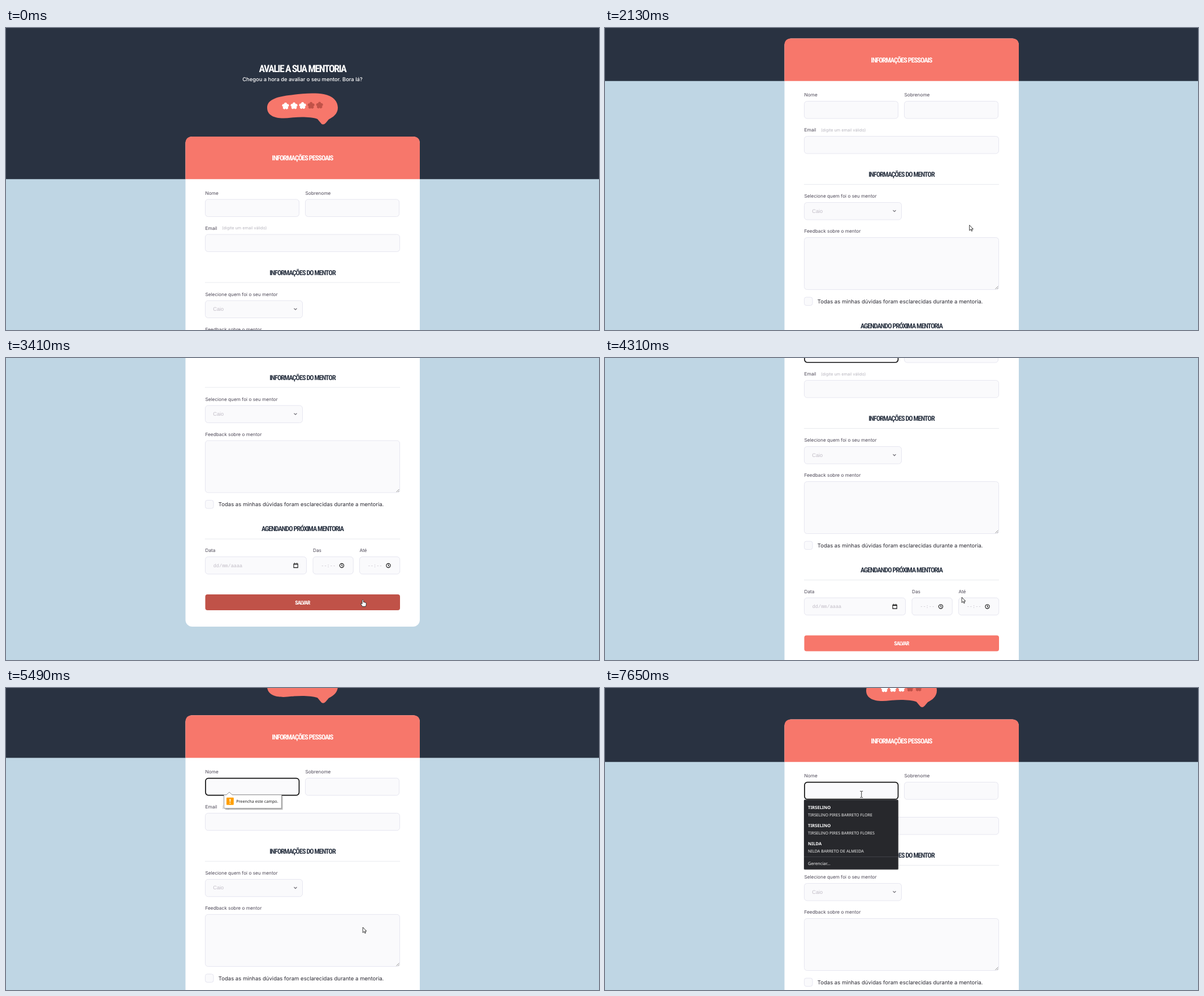
An HTML page for the animation above (8 s loop, 1049 by 534 pixels).

```html
<!DOCTYPE html>
<html lang="pt-BR">
<head>
<meta charset="utf-8">
<title>Avalie a sua mentoria</title>
<style>
  html, body { margin: 0; height: 100%; overflow: hidden; background: #bfd6e4; }
  svg { display: block; width: 100vw; height: 100vh; }
  text { font-family: Inter, sans-serif; text-rendering: geometricPrecision; }
  .head { font-family: "Roboto Condensed", Roboto, sans-serif; font-weight: 700;
          font-stretch: condensed; letter-spacing: -.08em; text-anchor: middle; }
  .h1 { font-size: 17.8px; fill: #fff; }
  .h2 { font-size: 12.2px; fill: #293241; }
  .light { fill: #fff; }
  .save { font-size: 9.7px; fill: #fff; }
  .sub { font-size: 9.35px; font-weight: 500; fill: #fff; text-anchor: middle; }
  .label { font-size: 8.25px; fill: #4e4958; }
  .hint { font-size: 7.25px; fill: #b7b5be; }
  .check { font-size: 9.55px; fill: #2b2a33; }
  .option { font: 9.2px "Liberation Sans", sans-serif; fill: #c1bcc6; }
  .mono { font: 8.6px "Liberation Mono", monospace; fill: #c1bcc6; }
  .tip { font: 7.2px "Noto Sans", sans-serif; fill: #222; }
  .bold { font: 600 7.6px "Noto Sans", sans-serif; fill: #fff; }
  .small { font: 7.2px "Noto Sans", sans-serif; fill: #f2f2f2; }
  .more { font: 7.6px "Noto Sans", sans-serif; fill: #f2f2f2; }
  .field { fill: #fafafc; stroke: #e6e6f0; }
  .rule { stroke: #e8eaee; }
  .icon { fill: none; stroke: #111; stroke-width: 1.1; }
</style>
</head>
<body>
<svg viewBox="0 0 1049 534" preserveAspectRatio="none">
  <defs>
    <g id="flower"></g>
    <g id="clock" class="icon"><circle r="3.6"/><path d="M0-2.3V.2L1.6 1"/></g>
  </defs>
  <g id="page"></g>
  <g id="menu"></g>
  <g id="cursor" stroke="#222" stroke-width=".9" stroke-linejoin="round" fill="#fff">
    <path id="arrow" d="M0 0V9.6L2.3 7.5 3.8 10.8 5.2 10.1 3.8 7H6.6Z"/>
    <path id="hand" d="M-1.2 1Q0-1 1.1 1V4.2Q2.1 3.5 2.9 4.6 3.9 4 4.6 5.1 6 4.8 6 6.2V8.6Q5.8 10.2 4.8 12H-.8Q-1.6 9.8-3.6 7.6-3.8 6-2.3 6.4L-1.2 7.3Z"/>
    <path id="beam" fill="none" d="M-2.5-5.5H-.6L0-5 .6-5.5H2.5M0-5V5M-2.5 5.5H-.6L0 5 .6 5.5H2.5"/>
  </g>
</svg>
<script>
const LOOP = 8000;
const $ = id => document.getElementById(id);
const text = (cls, x, y, s) => `<text class="${cls}" x="${x}" y="${y}">${s}</text>`;
const head = (cls, y, s) => text('head ' + cls, 524.5, y, s);
const rule = y => `<path class="rule" d="M352 ${y}H697"/>`;
const box = (x, y, w, h = 30.5, r = 5) =>
  `<rect class="field" x="${x}" y="${y}" width="${w}" height="${h}" rx="${r}"/>`;
// A label with its input box below
const field = (label, x, y, w, h) => text('label', x, y - 8.4, label) + box(x, y, w, h);
const use = (id, x, y, fill = '') => `<use href="#${id}" x="${x}" y="${y}" fill="${fill}"/>`;
const five = fn => [0, 1, 2, 3, 4].map(fn).join('');

$('flower').innerHTML = '<circle r="3.6"/>' + five(i =>
  `<circle cy="-3.7" r="2.5" transform="rotate(${i * 72})"/>`);

$('page').innerHTML = `
  <path fill="#293241" d="M0 0H1049V267.2H0Z"/>
  ${head('h1', 77.8, 'AVALIE A SUA MENTORIA')}
  ${text('sub', 524.5, 93.8, 'Chegou a hora de avaliar o seu mentor. Bora lá?')}
  <path fill="#f7776b" d="M462 141C462 127 478 122 500 119 520 116 545 114 562 117
    579 120 587 130 587 141 587 152 578 158 571 161.5L565.5 168Q560 173.5 556 167L551 161
    C540 157 520 157 505 158.5 480 162 462 157 462 141Z"/>
  ${five(i => use('flower', 494.5 + i * 15.05, 138 - i * .35, i < 3 ? '#fff' : '#c05248'))}
  <rect x="317.5" y="192" width="414.5" height="681" rx="12" fill="#fff"/>
  <path fill="#f7776b" d="M317.5 267.2V204Q317.5 192 329.5 192H720Q732 192 732 204V267.2Z"/>
  ${head('h2 light', 234.4, 'INFORMAÇÕES PESSOAIS')}
  ${field('Nome', 352.5, 303, 166)}${field('Sobrenome', 529.5, 303, 166)}
  ${field('Email', 352.5, 365, 344)}${text('hint', 382, 356.4, '(digite um email válido)')}

  ${head('h2', 436.5, 'INFORMAÇÕES DO MENTOR')}${rule(450)}
  ${field('Selecione quem foi o seu mentor', 352.5, 482, 172)}
  ${text('option', 366.3, 500, 'Caio')}
  <path fill="none" stroke="#77757d" stroke-width="1.3" d="M509.5 495.7 512 498.2 514.5 495.7"/>
  ${field('Feedback sobre o mentor', 352.5, 544, 344, 92)}
  <path stroke="#777" stroke-width=".8" d="M690.5 635 695.5 630M693.5 635 695.5 633"/>
  ${box(352.5, 649.5, 14.5, 14.5, 3.5)}
  ${text('check', 375.8, 660.2, 'Todas as minhas dúvidas foram esclarecidas durante a mentoria.')}

  ${head('h2', 704, 'AGENDANDO PRÓXIMA MENTORIA')}${rule(718)}
  ${field('Data', 352.5, 749.5, 179)}${text('mono', 366.7, 767.6, 'dd/mm/aaaa')}
  <path class="icon" d="M509 762H516.2V768.6H509ZM509 762.8H516.2M510.6 761V760M514.6 761V760"/>
  ${['Das', 'Até'].map((label, i) => {
    const x = 543 + i * 82.4;
    return field(label, x, 749.5, 71.3) + text('mono', x + 14.3, 767.6, '--:--') + use('clock', x + 51, 765);
  }).join('')}
  <rect id="button" x="352.5" y="816" width="344.5" height="28" rx="4"/>
  ${head('save', 833.5, 'SALVAR')}

  <rect id="ring" x="353" y="303.2" width="165.5" height="30" rx="5" fill="none" stroke="#111" stroke-width="1.7"/>
  <path id="caret" stroke="#b9b9c0" d="M366.6 313.5V323"/>
  <g id="tip">
    <path fill="#0004" d="M388 335H489.5V359H388Z"/>
    <path fill="#fff" stroke="#8a8a8a" stroke-width=".9" d="M385.5 332.5H390L395 327.7 400 332.5H487.5V356.5H385.5Z"/>
    <rect x="390" y="337.3" width="12.8" height="13" rx="1" fill="#ff9f00"/>
    <path stroke="#fff" stroke-width="1.7" d="M396.4 339.6V344.8M396.4 346.3V348.1"/>
    ${text('tip', 407.2, 347, 'Preencha este campo.')}
  </g>`;

const people = [
  ['TIRSELINO', 'TIRSELINO PIRES BARRETO FLORE'],
  ['TIRSELINO', 'TIRSELINO PIRES BARRETO FLORES'],
  ['NILDA', 'NILDA BARRETO DE ALMEIDA'],
];
$('menu').innerHTML = `
  <rect x="351.5" y="198" width="168" height="124" rx="2" fill="#0003"/>
  <rect x="352" y="197.5" width="166.7" height="123.3" rx="1.5" fill="#27282c"/>
  ${people.map(([first, full], i) =>
    text('bold', 359, 214 + i * 32, first) + text('small', 359, 226.8 + i * 32, full)).join('')}
  <path stroke="#404248" d="M352 298.5H518.7"/>
  ${text('more', 359, 313.2, 'Gerenciar...')}`;

const ramp = (t, from, length) => Math.min(1, Math.max(0, (t - from) / length));
const ease = p => p * p * (3 - 2 * p);
// Distance covered at t by an eased move
const move = (t, from, length, distance) => distance * ease(ramp(t, from, length));

const scrollAt = t =>
  move(t, 1290, 440, 56.5) + move(t, 1740, 390, 117) + move(t, 2150, 200, 103) +
  move(t, 2420, 560, 121.5) + move(t, 3750, 820, -95) + move(t, 4966, 600, -166.5);

const cursorX = t => 992 + move(t, 670, 490, -278) + move(t, 1160, 200, -69.3) +
  move(t, 2850, 480, -13.5) + move(t, 5640, 680, -168) + move(t, 6500, 700, -9.5);
const cursorY = t => 532 + move(t, 670, 490, -155) + move(t, 1160, 200, -28.5) +
  move(t, 2850, 480, 79) + move(t, 3600, 70, -4.5) + move(t, 5640, 680, -230) + move(t, 6500, 700, -5);

function cursorKind(t) {
  if (t < 680) return '';
  if (t >= 5700) return 'beam';
  return t >= 3240 && t < 3850 ? 'hand' : 'arrow';
}

const show = (id, on) => $(id).setAttribute('visibility', on ? 'visible' : 'hidden');

function draw(t) {
  $('page').setAttribute('transform', `translate(0 ${-scrollAt(t)})`);
  $('cursor').setAttribute('transform', `translate(${cursorX(t)} ${cursorY(t)})`);
  for (const id of ['arrow', 'hand', 'beam']) show(id, id === cursorKind(t));

  const hover = ramp(t, 3220, 190) - ramp(t, 3850, 200);
  $('button').setAttribute('fill', `rgb(${247 - 55 * hover},${119 - 37 * hover},${107 - 35 * hover})`);

  const focused = t >= 3820;
  show('ring', focused);
  show('caret', focused && (t - 3880 + 1060) % 1060 < 530);
  $('tip').setAttribute('opacity', ramp(t, 4600, 120) - ramp(t, 6050, 150));
  show('menu', t >= 7450);
}

const start = performance.now();
(function tick() {
  draw((performance.now() - start) % LOOP);
  requestAnimationFrame(tick);
})();
</script>
</body>
</html>
```
